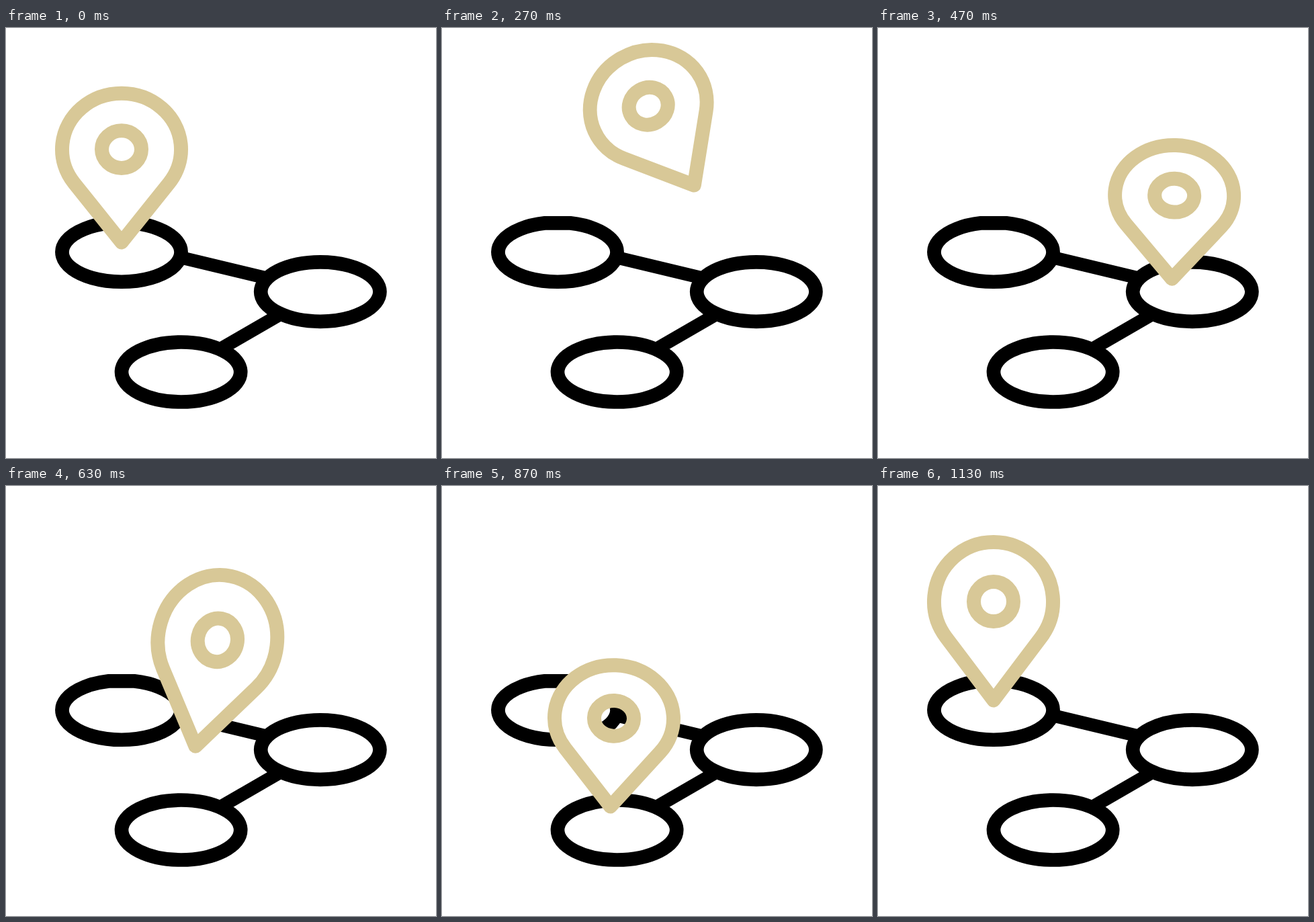
These frames come from a looping animation (640 px wide and 640 px high, 1.67 s). An HTML page:

```html
<!DOCTYPE html>
<html lang="en">
<head>
<meta charset="utf-8">
<title>Hopping map pin</title>
<style>
  html, body { margin: 0; width: 100%; height: 100%; overflow: hidden; background: #fff; }
  svg { display: block; width: 100%; height: 100%; }
  .route { fill: none; stroke: #000; stroke-width: 20.7; stroke-linejoin: round; }
  .link { stroke-width: 19.5; }
  .pin {
    fill: #fff; fill-rule: evenodd; stroke: #d8c897; stroke-width: 21;
    stroke-linejoin: round; vector-effect: non-scaling-stroke;
  }
</style>
</head>
<body>
<svg viewBox="0 0 640 640">
  <g class="route">
    <path class="link" d="M264 342.5L386 371.7M405 428L322 476"/>
    <path d="M153 290.4A88.5 44.2 0 1 0 191 290.4Z"/>
    <ellipse cx="467.8" cy="392.6" rx="88.6" ry="44.2"/>
    <ellipse cx="260.6" cy="512" rx="88.6" ry="44.5"/>
  </g>
  <!-- the pin's tip is at the origin -->
  <path class="pin" id="pin" d="M0 0L-70.7 -93.8A88.5 88.5 0 1 1 70.7 -93.8Z
    M-29.5 -147a29.5 29.5 0 1 0 59 0a29.5 29.5 0 1 0 -59 0Z"/>
</svg>
<script>
const LOOP = 1670, STEP = 1000 / 30;
const pin = document.getElementById('pin');

// Times count steps; the pin squashes at `dip` and lands with its tip at (x, y).
const home = { x: 172, y: 319 };
const hops = [
  { dip: 1.8, start: 3, end: 13, x: 449, y: 379, push: 0.62, rise: 131, lean: -30.5, stretch: -0.075 },
  { dip: 13.6, start: 13, end: 23, x: 253, y: 490, push: 0.62, rise: 88, lean: 12, stretch: 0.1 },
  { dip: 25, start: 25, end: 34, ...home, push: -0.04, rise: 50, lean: 14, stretch: 0.126 }
];

const clamp = u => Math.min(1, Math.max(0, u));
const ease = u => (1 - Math.cos(Math.PI * u)) / 2;
const bump = u => Math.max(0, Math.sin(Math.PI * u ** 1.15)) ** 1.3;
const squash = d => 0.18 * Math.exp(-((d / 1.7) ** 2));

function pose(step) {
  let { x, y } = home, lean = 0, stretch = 1, lift = 0;
  for (const hop of hops) {
    const u = clamp((step - hop.start) / (hop.end - hop.start));
    const along = ease(u + hop.push * u * (1 - u));
    const air = bump(u);
    x += (hop.x - x) * along;
    y += (hop.y - y) * along;
    lift += hop.rise * air;
    lean += hop.lean * air;
    stretch += hop.stretch * air - squash(step - hop.dip);
  }
  return { x, y: y - lift, lean, stretch };
}

function draw(ms) {
  const step = Math.floor((ms % LOOP + 4) / STEP);
  const { x, y, lean, stretch } = pose(step);
  pin.setAttribute('transform', `translate(${x} ${y}) rotate(${lean}) scale(1 ${stretch})`);
}

let start;
function tick(now) {
  start ??= now;
  draw(Math.max(0, now - start));
  requestAnimationFrame(tick);
}
draw(0);
requestAnimationFrame(tick);
</script>
</body>
</html>
```
